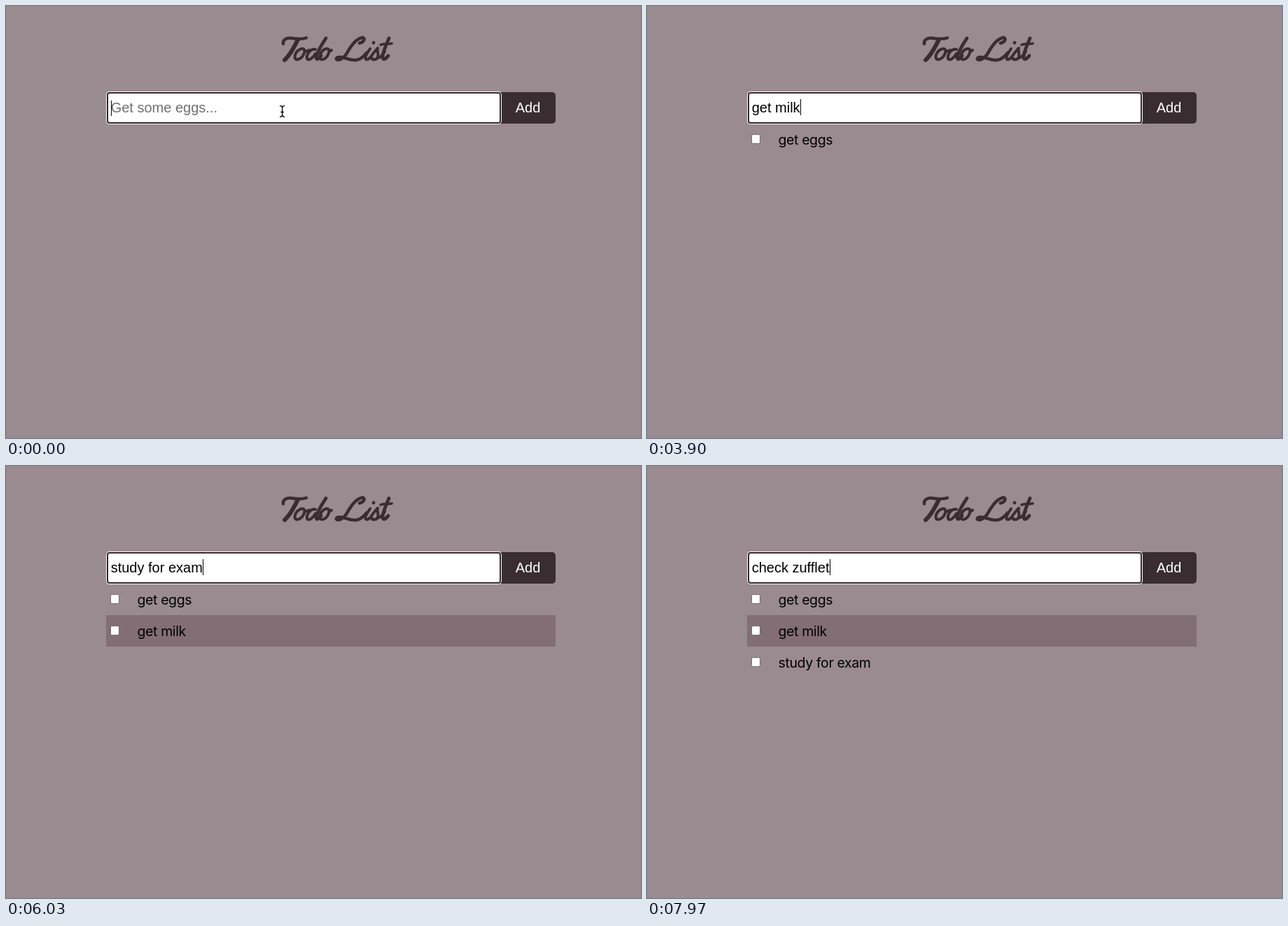
Recreate the animation shown at these times as an HTML page. Size 907 by 617 pixels, loop 8000 ms.

```html
<!DOCTYPE html>
<html lang="en">
<head>
<meta charset="utf-8">
<title>Todo List</title>
<style>
  html, body { margin: 0; width: 100%; height: 100%; overflow: hidden; background: #9a8b91; }
  #stage { position: relative; width: 907px; height: 617px; overflow: hidden; }
  #stage > *, .row > * { position: absolute; box-sizing: border-box; }
  svg { left: 0; top: 0; fill: none; stroke-linecap: round; stroke-linejoin: round; }
  .add, .field { font: 20px/24px "Liberation Sans", Arial, sans-serif; white-space: pre; }
  .add { left: 704px; top: 123px; width: 81px; height: 45px; padding: 10px 0 0 2px;
         border-radius: 0 5px 5px 0; background: #392d32; color: #fff; text-align: center; }
  .box { left: 144px; top: 123px; width: 563px; height: 45px; border: 2px solid #30262a;
         border-radius: 4px; background: #fff; box-shadow: 0 0 0 1px #fff; }
  .field { left: 149.7px; top: 133px; color: #000; }
  .hint { color: #707070; }
  #caret { position: absolute; left: 100%; top: 0; width: 1px; height: 23px; background: #000; }
  .empty #caret { left: .3px; top: 2px; height: 22px; }
  #list { left: 0; top: 168px; }
  .row { position: absolute; left: 143px; width: 642px; height: 45px; color: #000;
         font: 19.5px/24px Inter, sans-serif; letter-spacing: -.02em; }
  .row:nth-child(even) { background: #836e76; }
  .check { left: 6px; top: 15px; width: 13px; height: 14px; border: 1px solid #716a6d;
           border-radius: 2.5px; background: #fff; }
  .label { left: 44.5px; top: 11px; white-space: pre; }
</style>
</head>
<body>
<div id="stage">
  <svg width="907" height="110" stroke="#392d32" stroke-width="4" role="img" aria-label="Todo List">
    <!-- T -->
    <path stroke-width="4.4" d="M396 54C395 48 401 45 408 46C415 47 422 48 429 45.5"/>
    <path stroke-width="6" d="M417 48C412 57 407 69 398 77"/>
    <!-- o d o -->
    <path d="M424 61C417 61 411 69 413 75C416 79 424 74 426 67C427 63 426 61 424 61M427 65C429 65 431 64 433 63"/>
    <path d="M442 62C435 60 429 69 430 75C432 79 438 75 442 68"/>
    <path stroke-width="4.8" d="M457 46C451 55 444 66 443 74C444 78 447 75 450 71"/>
    <path d="M459 61C452 61 447 69 449 75C452 79 459 74 461 67C462 63 461 61 459 61M462 65L465 63"/>
    <!-- L -->
    <path stroke-width="4.6" d="M505 53C511 52 514 46 509 45C502 46 495 54 490 62C486 70 481 76 475 77C470 77 471 73 477 73C485 73 492 79 501 77C507 76 511 72 515 67"/>
    <!-- i s t -->
    <path d="M520 61C516 67 512 74 514 76C517 78 521 73 525 67L531 60C529 65 533 67 531 73C529 78 523 77 522 74M532 74C536 73 539 68 541 65"/>
    <path stroke-width="4.8" d="M525 52.5h.1M547 46C543 56 537 68 538 74C539 78 543 75 546 71"/>
    <path stroke-width="3.6" d="M535 55.5C540 53 546 55 551 53.5"/>
  </svg>
  <div class="add">Add</div>
  <div class="box"></div>
  <div class="field" id="field"><span id="text"></span><i id="caret"></i></div>
  <svg id="mouse" width="907" height="200">
    <path id="beam" stroke="#000" stroke-width="1.3" d="M391.5 142.7Q394.6 142.7 394.6 145.5V155.5Q394.6 158.3 391.5 158.3M397.7 142.7Q394.6 142.7 394.6 145.5M394.6 155.5Q394.6 158.3 397.7 158.3M392.8 151.5H396.4"/>
  </svg>
  <div id="list"></div>
</div>
<script>
const LOOP = 8000, ROW = 45, FIRST_KEY = 930;
const BLINK = [300, 800];
const HINT = "Get some eggs...";

// Each burst: start, end, keys spread evenly between them ("\n" submits)
const bursts = [
  [930, 1300, "get "], [1470, 1470, "e"], [1630, 1970, "ggs"], [2270, 2270, "\n"],
  [2600, 3000, "get "], [3370, 3770, "milk"], [4070, 4070, "\n"],
  [4230, 4230, "s"], [4470, 5500, "tudy for e"], [5800, 6030, "xam"], [6170, 6170, "\n"],
  [6670, 6800, "ch"], [6870, 7070, "eck"], [7200, 7200, " "], [7265, 7330, "zu"],
  [7470, 7730, "ffl"], [7900, 7970, "et"]
];
const keys = bursts.flatMap(([from, to, chars]) =>
  [...chars].map((key, i) => ({ key, at: from + (to - from) * i / Math.max(1, chars.length - 1) })));

const $ = id => document.getElementById(id);
const field = $("field"), text = $("text"), caret = $("caret"), mouse = $("mouse"), list = $("list");

const show = (part, on) => { part.style.visibility = on ? "visible" : "hidden"; };

function addPart(parent, className, content = "") {
  const part = document.createElement("div");
  part.className = className;
  part.textContent = content;
  parent.append(part);
  return part;
}

function showItems(items) {
  list.replaceChildren();
  items.forEach((item, i) => {
    const row = addPart(list, "row");
    row.style.top = i * ROW + "px";
    addPart(row, "check");
    addPart(row, "label", item);
  });
}

let shown = -1;
function draw(time) {
  show(caret, time < BLINK[0] || time >= BLINK[1]);
  show(mouse, time < FIRST_KEY);
  const count = keys.filter(k => k.at <= time + .01).length;
  if (count === shown) return;
  shown = count;
  const items = keys.slice(0, count).map(k => k.key).join("").split("\n");
  const typed = items.pop();
  text.textContent = typed || HINT;
  text.className = typed ? "" : "hint";
  field.classList.toggle("empty", !typed);
  showItems(items);
}

const start = performance.now();
function tick() {
  draw((performance.now() - start) % LOOP);
  requestAnimationFrame(tick);
}
tick();
</script>
</body>
</html>
```
